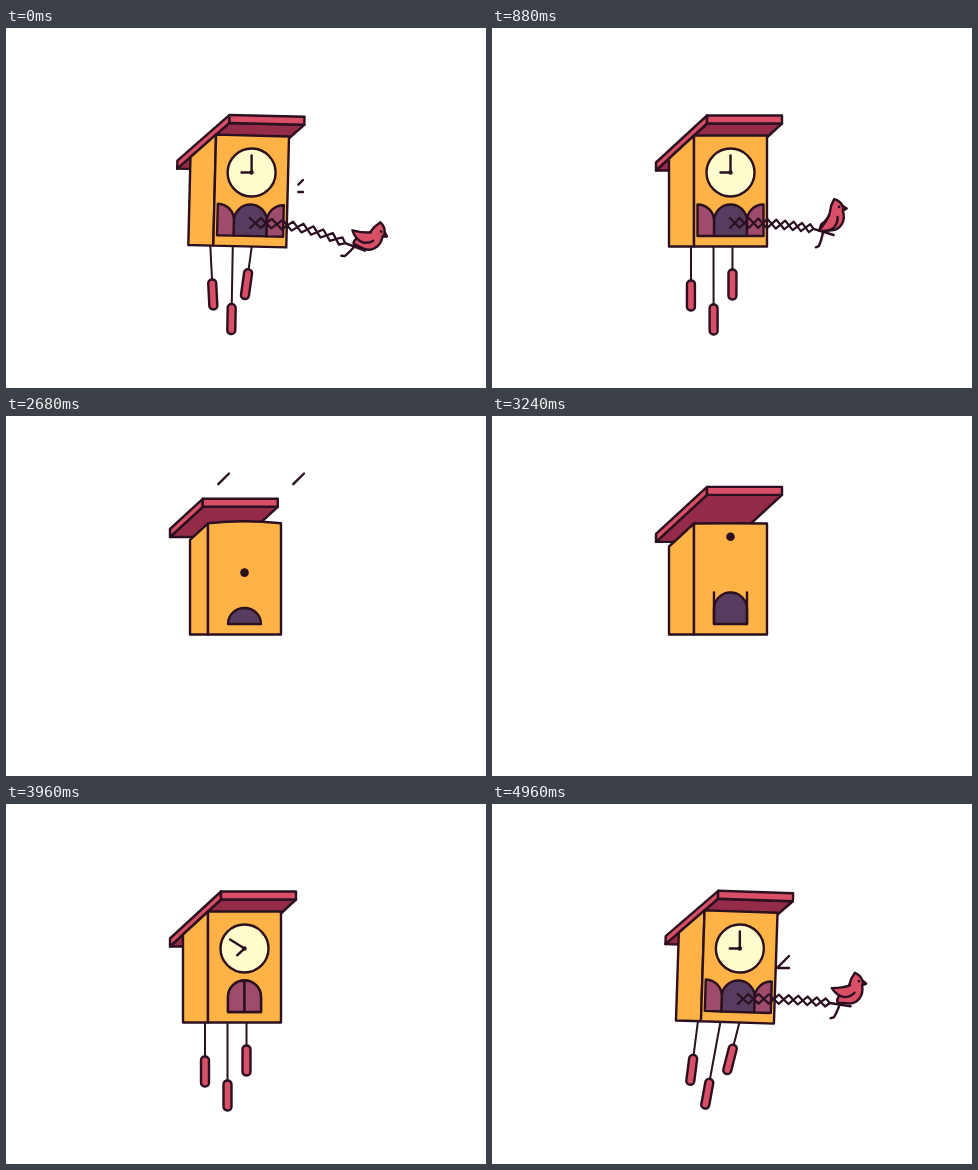
Animation, 480 px wide and 360 px high, one loop 5000 ms. Source, as an HTML page with a canvas:

```html
<!DOCTYPE html>
<html lang="en">
<head>
<meta charset="utf-8">
<title>Cuckoo clock</title>
<style>
  html, body { margin: 0; width: 100%; height: 100%; overflow: hidden; background: #fff; }
  canvas { display: block; width: 480px; height: 360px; }
</style>
</head>
<body>
<canvas id="stage"></canvas>
<script>
const canvas = document.getElementById('stage');
const ctx = canvas.getContext('2d');
const ratio = window.devicePixelRatio || 1;
canvas.width = 480 * ratio;
canvas.height = 360 * ratio;

const LOOP = 5000;
const INK = '#2a1020', ORANGE = '#ffb246', RED = '#d94f66', MAROON = '#932b49';
const PLUM = '#9f4b6c', NIGHT = '#573c60', CREAM = '#fffdce';

// Motion rules: progress between two times, easings, damped waves.
const part = (t, start, end) => Math.max(0, Math.min(1, (t - start) / (end - start)));
const ease = (t, start, end) => (1 - Math.cos(Math.PI * part(t, start, end))) / 2;
const slowDown = (t, start, end) => 1 - (1 - part(t, start, end)) ** 2;
const fall = (t, start, end) => part(t, start, end) ** 2;

function spring(t, start, period, fade) {
  const s = Math.max(0, t - start);
  return 1 - Math.exp(-s / fade) * Math.cos(2 * Math.PI * s / period);
}
function ripple(t, start, period, fade) {
  const s = Math.max(0, t - start);
  return Math.exp(-s / fade) * Math.sin(2 * Math.PI * s / period);
}

// The strike after the loop point runs on from 5000 to 6720.
function poseAt(t) {
  const sway = -24 * (ease(t, 4260, 4780) - spring(t, 4820, 320, 156));
  const settle = ease(t, 4960, 5100);
  const nod = ripple(t, 4956, 320, 200);
  return {
    sway,
    lean: .0036 * sway * part(t, 4800, 4940),
    height: 111 * spring(t, 2000, 520, 130),
    bulge: -16 * ripple(t, 2320, 290, 260),
    roof: -21.5 * (1 - fall(t, 3160, 3330)) + 4 * ripple(t, 3330, 200, 80),
    drop: -92 * (1 - fall(t, 3320, 3480)) + 22 * ripple(t, 3480, 240, 120),
    dialY: 163 - 44.4 * ease(t, 2520, 3200) + 26.4 * ease(t, 3200, 3400),
    dialR: 4.3 * part(t, 2520, 2620) + 19.7 * spring(t, 3300, 360, 80),
    arch: ease(t, 2560, 2800),
    door: ease(t, 3240, 3440) - 2 * ease(t, 4800, 4900),
    birdX: 235 + 99 * spring(t, 4840, 340, 93),
    birdY: 201 + 4 * settle + 36 * ripple(t, 4969, 320, 200),
    birdTurn: 42 * nod - 3 * settle,
    perch: 7 + 10 * settle + 20 * nod,
    wing: -40 * ease(t, 4960, 5120)
  };
}

const WEIGHTS = [
  { x: 199, cord: 34, period: 336 },
  { x: 221.5, cord: 58, period: 372 },
  { x: 240.5, cord: 23, period: 470 }
];

function paint(path, fill, width = 2.4) {
  if (fill) { ctx.fillStyle = fill; ctx.fill(path); }
  ctx.lineWidth = width;
  if (width) ctx.stroke(path);
}
const shape = (d, fill, width) => paint(new Path2D(d), fill, width);
const poly = (points, fill, width) => shape('M' + points.join('L') + 'Z', fill, width);
const line = (points, width) => shape('M' + points.join('L'), null, width);

function disc(x, y, r, fill, width) {
  const path = new Path2D();
  path.arc(x, y, r, 0, 7);
  paint(path, fill, width);
}

function placed(x, y, angle, draw) {
  ctx.save();
  ctx.translate(x, y);
  ctx.rotate(angle);
  draw();
  ctx.restore();
}
const rad = deg => deg * Math.PI / 180;

function drawWeights(t, pose) {
  for (const { x, cord, period } of WEIGHTS) {
    const swing = 33 * ripple(t, 4820, period, 180);
    placed(x, 219, rad(swing) - pose.lean, () => {
      const top = cord + pose.drop;
      line([[0, -2], [0, top]], 2);
      const weight = new Path2D();
      weight.roundRect(-4, top, 8, 30, 3.8);
      paint(weight, RED);
    });
  }
}

function drawRoof(t, pose) {
  const depth = slowDown(t, 2480, 2980);
  const left = 164, low = 143 + pose.roof;
  const x = left + 51 * depth, y = low - 47 * depth;
  poly([[left, low], [x, y], [x + 75, y], [left + 75, low]], MAROON);
  poly([[left, low], [left, low - 8], [x, y - 8], [x, y]], RED);
  poly([[x, y - 8], [x + 75, y - 8], [x + 75, y], [x, y]], RED);
}

function drawBox(t, pose) {
  const top = 219 - pose.height;
  const depth = slowDown(t, 2460, 2930);
  if (depth) {
    const x = 202 - 25 * depth;
    poly([[x, top + 23 * depth], [202, top], [202, 219], [x, 219]], ORANGE);
  }
  shape(`M202 ${top}Q238 ${top + pose.bulge} 275 ${top}V219H202Z`, ORANGE);
}

function drawDoors(t, pose) {
  if (!pose.arch) return;
  const tall = 31.5 * pose.arch, round = Math.min(16.5, tall), spring = 208.5 - tall + round;
  shape(`M222 208.5V${spring}A16.5 ${round} 0 0 1 255 ${spring}V208.5Z`, NIGHT);
  if (t < 3200) return;
  for (const [hinge, side] of [[222, 1], [255, -1]]) {
    const width = side * 16.5 * pose.door;
    const edge = hinge + width;
    shape(`M${hinge} 208.5V193.5C${hinge} 184 ${hinge + width * .45} 177 ${edge} 177V208.5Z`, PLUM);
  }
}

function drawDial(t, pose) {
  if (!pose.dialR) return;
  const y = pose.dialY;
  if (pose.dialR <= 4.4) return disc(238.5, y, pose.dialR, INK, 0);
  disc(238.5, y, pose.dialR, CREAM);
  const left = 1 - ease(t, 3480, 4320), grow = part(t, 3420, 3520);
  if (!grow) return;
  const hand = (deg, length) => placed(238.5, y, rad(deg) - pose.lean, () => line([[0, 0], [0, -length * grow]]));
  hand(-1080 * left, 17);
  hand(270 - 110 * left, 10);
  disc(238.5, y, 2.2, INK, 0);
}

// Scissor chain: two crossing zigzags along a sagging curve.
function drawChain(x0, y0, x1, y1) {
  const steps = 10, strands = [[], []];
  const cx = x0 + (x1 - x0) * .55, cy = y0 - 1;
  for (let i = 0; i < steps; i++) {
    const p = i / (steps - .5), q = 1 - p;
    const x = q * q * x0 + 2 * p * q * cx + p * p * x1;
    const y = q * q * y0 + 2 * p * q * cy + p * p * y1;
    const angle = Math.atan2(q * (cy - y0) + p * (y1 - cy), q * (cx - x0) + p * (x1 - cx));
    strands.forEach((strand, n) => {
      const size = ((i + n) % 2 ? -1 : 1) * (5 - p);
      strand.push([x - Math.sin(angle) * size, y + Math.cos(angle) * size]);
    });
  }
  for (const strand of strands) line([...strand, [x1, y1]], 2.2);
}

function drawBird(t, pose) {
  if (t < 4840) return;
  const x = pose.birdX, y = pose.birdY, tilt = rad(pose.perch);
  const size = .4 + .6 * part(t, 4820, 4930);
  drawChain(238 + pose.sway - 41 * pose.lean, 195, x - 13 * Math.cos(tilt), y - 13 * Math.sin(tilt));
  placed(x, y, rad(pose.birdTurn), () => {
    ctx.scale(size, size);
    shape('M-2 -4Q-5 8 -8 13L-11 14');
    shape('M10 -33Q16 -31 18 -26L22 -23L18 -21C21 -10 14 -2 6 -2H-5Q-7 -4 -4 -9Q3 -13 5 -20Q6 -27 10 -33Z', RED);
    shape('M18 -26L22 -23L18 -21Z', INK, .8);
    disc(14.5, -25, 1.4, INK, 0);
    placed(9, -16, rad(pose.wing), () => {
      shape('M-3 -4Q-10 -1 -21 0Q-15 8 -7 8Q-1 7 2 3', RED);
    });
  });
  placed(x, y, tilt, () => line([[-13, 0], [8, 0]]));
}

function streak(x0, y0, x1, y1, from, to) {
  if (to <= from) return;
  const at = p => [x0 + (x1 - x0) * p, y0 + (y1 - y0) * p];
  line([at(from), at(to)]);
}

function drawSparks(t) {
  for (const x of [198.5, 273.5]) streak(x, 82, x + 24.5, 57.5, part(t, 2520, 2806), part(t, 2480, 2560));
  for (const rise of [12, 0]) streak(285, 164, 297, 164 - rise, part(t, 4960, 5027), part(t, 4880, 4950));
}

function render(time) {
  ctx.setTransform(ratio, 0, 0, ratio, 0, 0);
  ctx.fillStyle = '#fff';
  ctx.fillRect(0, 0, 480, 360);
  if (time >= 1720 && time < 2040) return;

  const t = time < 1720 ? time + LOOP : time;
  const pose = poseAt(t);
  ctx.strokeStyle = INK;
  ctx.lineJoin = ctx.lineCap = 'round';

  placed(238 + pose.sway, 153.5, pose.lean, () => {
    ctx.translate(-238, -154);
    if (t >= 3320) drawWeights(t, pose);
    if (t >= 2440) drawRoof(t, pose);
    drawBox(t, pose);
    drawDoors(t, pose);
    drawDial(t, pose);
  });
  drawBird(t, pose);
  drawSparks(t);
}

const began = performance.now();
function tick() {
  render((performance.now() - began) % LOOP);
  requestAnimationFrame(tick);
}
tick();
</script>
</body>
</html>
```
